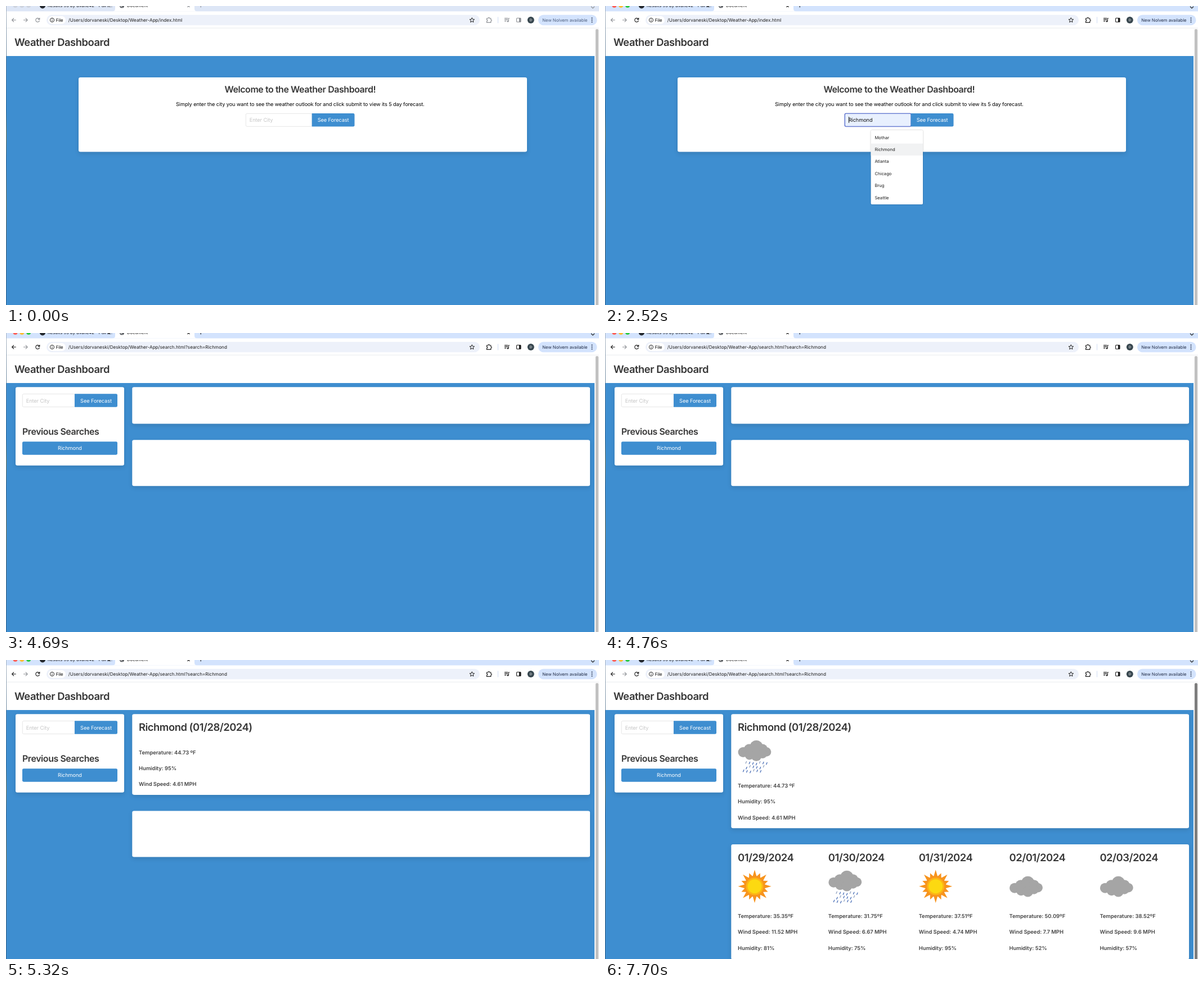
Animation of 1054x532 px, one loop 8000 ms. Source, as an HTML page:

```html
<!DOCTYPE html>
<html lang="en">
<head>
<meta charset="utf-8">
<title>Weather Dashboard</title>
<style>
  html, body { margin: 0; width: 100%; height: 100%; overflow: hidden; background: #fff; }
  svg { display: block; width: 1054px; height: 532px; --ink: #1f1f1f; --strip: #d3e3fd; --label: #1f2a44; }
  svg.idle { --ink: #8d9095; --strip: #dde6f6; --label: #4c5d7d; }
  text { font-family: Inter, "Liberation Sans", Arial, sans-serif; text-rendering: geometricPrecision; white-space: pre; }
  .body { font-size: 9.22px; letter-spacing: -.011em; }
  .title { font-size: 18.4px; font-weight: 600; letter-spacing: -.026em; fill: #363636; }
  .sub { font-size: 15.95px; font-weight: 600; letter-spacing: -.026em; fill: #363636; }
  .fact { font-size: 9.4px; font-weight: 600; letter-spacing: -.002em; fill: #424242; }
  .url { font-size: 8.17px; fill: #1f1f1f; }
  .small { font-size: 7.68px; fill: #1f1f1f; }
  .mid { text-anchor: middle; }
  .card { fill: #fff; filter: drop-shadow(0 3.5px 3.5px rgba(10, 10, 10, .13)); }
  .icon { fill: none; stroke: var(--ink); stroke-width: 1.15; }
  .field { fill: #fff; stroke: #dbdbdb; stroke-width: .7; }
  .field.on { stroke: #485fc7; stroke-width: 1.1; }
  .field.filled { fill: #e8f0fe; }
  .menu { fill: #fff; filter: drop-shadow(0 .6px 1px rgba(0, 0, 0, .28)); }
  .menu.soft { filter: drop-shadow(0 0 .6px rgba(0, 0, 0, .22)); }
</style>
</head>
<body>
<svg id="stage" viewBox="0 0 1054 532" xmlns="http://www.w3.org/2000/svg"></svg>
<script>
const LOOP = 8000;
const BLUE = '#3e8ed0';
const CITIES = ['Mothar', 'Richmond', 'Atlanta', 'Chicago', 'Brug', 'Seattle'];
const PATH = '/Users/dorvaneski/Desktop/Weather-App/';
const ROW = 21.4;

const text = (x, y, cls, str, extra = '') => `<text x="${x}" y="${y}" class="${cls}" ${extra}>${str}</text>`;
const rect = (x, y, w, h, r, attrs) => `<rect x="${x}" y="${y}" width="${w}" height="${h}" rx="${r}" ${attrs}/>`;
const circle = (x, y, r, attrs) => `<circle cx="${x}" cy="${y}" r="${r}" ${attrs}/>`;
const path = (d, attrs = 'class="icon"') => `<path d="${d}" ${attrs}/>`;
const card = (x, y, w, h) => rect(x, y, w, h, 3.3, 'class="card"');
const range = (n, fn) => Array.from({ length: n }, (_, i) => fn(i)).join('');

function star(cx, cy, points, radius) {
  let d = '';
  for (let i = 0; i < points * 2; i++) {
    const a = Math.PI * (i / points - .5), r = radius(i);
    d += `${i ? 'L' : 'M'}${(cx + r * Math.cos(a)).toFixed(2)} ${(cy + r * Math.sin(a)).toFixed(2)}`;
  }
  return d + 'Z';
}

// Weather icons, drawn in a 60 x 60 box
const BUMPS = [[9.5, 23, 9], [20.5, 18.5, 10], [33, 13.5, 11.5], [44, 17.5, 9],
  [51, 22.5, 8.3], [21, 28, 8.5], [33, 29.5, 9.4], [44, 26, 8]];
const puff = dy => BUMPS.map(([x, y, r]) => circle(x, y + dy, r, 'fill="#a5a5a5"')).join('');
const drops = range(19, i => {
  const row = Math.floor(i / 6.5), col = i % 6.5;
  const x = 15.5 + col * 6.1 - row * 2.3, y = 39.5 + row * 7 + (i * 5 % 4);
  return path(`M${x} ${y}l-1.4 3.3`, `stroke="${i % 4 ? '#4168b4' : '#8d9fbd'}" stroke-width="1.25" stroke-linecap="round"`);
});
const ICONS = {
  rain: puff(0) + drops,
  cloud: puff(10),
  sun: path(star(30, 30, 16, i => i % 2 ? 18 : i % 4 ? 25.5 : 29.5), 'fill="#f7941e"') +
    circle(30, 30, 18.5, 'fill="#f7941e"') + circle(30, 30, 15.5, 'fill="#fdb515"') + circle(30, 30, 12.5, 'fill="#fcd911"')
};

function toolbar() {
  const lights = ['#ff5f57', '#febc2e', '#28c840']
    .map((c, i) => circle(16.5 + i * 11.8, -1, 4, `class="light" fill="${c}"`)).join('');
  const cross = x => path(`M${x - 2} -2l4 4m0 -4l-4 4`);
  return rect(0, 0, 1054, 39, 0, 'fill="#fff"') +
    rect(0, 0, 1054, 9.5, 0, 'style="fill:var(--strip)"') + lights +
    path('M189 9.6Q194 9.6 194 5V-5H335V5Q335 9.6 340 9.6Z', 'fill="#fff"') +
    circle(65, -.5, 5, 'fill="#24292f"') +
    text(74, 2, 'small', 'Results 95 by dvane42 - Pull r…') + cross(183) +
    circle(206, -.5, 4, 'fill="#4b4f54"') + path('M203 1l2.5 -1 1 2.5M207 -3v2l2 1', 'fill="none" stroke="#fff" stroke-width=".9"') +
    text(215, 2, 'small', 'Document') + cross(324.5) +
    path('M343 -.5h6.4m-3.2 -3v6') + path('M1040 1l3 3 3 -3') +
    path('M17.8 25H10.6m3.4 -3.4L10.6 25l3.4 3.4', 'id="back" class="icon"') +
    path('M31 25h7.2m-3.4 -3.4L38.2 25l-3.4 3.4', 'fill="none" stroke="#8d9095" stroke-width="1.1"') +
    path('M59.1 23.2A3.4 3.4 0 1 0 59.5 26M59.8 21v2.9h-2.9') +
    rect(72, 15.8, 770, 18.4, 9.2, 'fill="#edf1fa"') + rect(75, 18, 31, 14, 7, 'fill="#fff"') +
    circle(82, 25, 3.6, 'fill="none" stroke="#1f1f1f" stroke-width=".95"') +
    path('M82 24.6v2.3M82 22.8v.9', 'stroke="#1f1f1f" stroke-width="1"') +
    text(88.7, 27.7, 'small', 'File', 'font-weight="500"') + text(110.8, 27.9, 'url', '', 'id="url"') +
    path(star(828.3, 25.3, 5, i => i % 2 ? 2 : 4.5), 'fill="none" stroke="#1f1f1f" stroke-width="1"') +
    path('M854.5 22h2.3a1.4 1.4 0 0 1 2.8 0h2.2v2.2a1.4 1.4 0 0 1 0 2.8v2.3h-7.3v-2.3a1.3 1.3 0 0 0 0 -2.6Z') +
    path('M874.5 19.5v11', 'stroke="#cfdcf3"') +
    path('M886 21.8h6M886 24.3h6M886 26.8h3.2M895 22h-1.8v5') + circle(892, 27.3, 1.4, 'style="fill:var(--ink)"') +
    rect(907.6, 21.5, 7.4, 7, 1, 'class="icon"') + rect(911.8, 21.5, 3.2, 7, 0, 'style="fill:var(--ink)"') +
    circle(932.8, 25, 6, 'fill="#38474f"') + text(932.8, 27.1, 'mid', 'D', 'font-size="5.8" fill="#fff"') +
    rect(946, 15.8, 104.5, 18.4, 9.2, 'fill="#d3e3fd"') +
    text(993.4, 27.8, 'small mid', 'New Nolvem available', 'style="fill:var(--label)"') +
    range(3, i => circle(1041.5, 21.6 + i * 3.4, 1, 'fill="#1f2a44"')) +
    path('M0 39.2H1054', 'stroke="#e3e6eb" stroke-width=".8"');
}

// City input joined to its submit button
function form(x, y, split, end, live) {
  const h = 23.6, mid = y + 15.4, id = name => live ? `id="${name}"` : '';
  return rect(x + .3, y + .3, split - x, h - .6, 2.2, `${id('field')} class="field"`) +
    path(`M${split} ${y}H${end - 2.4}q2.4 0 2.4 2.4v${h - 4.8}q0 2.4 -2.4 2.4H${split}Z`, `${id('submit')} fill="${BLUE}"`) +
    text(x + 6.7, mid, 'body', 'Enter City', `${id('entry')} fill="#c6c6c6"`) +
    text((split + end) / 2, mid, 'body mid', 'See Forecast', 'fill="#fff"');
}

function welcome() {
  return card(129, 127, 797, 132.5) +
    text(522.8, 154.4, 'sub mid', 'Welcome to the Weather Dashboard!') +
    text(522.8, 177.5, 'body mid', 'Simply enter the city you want to see the weather outlook for and click submit to view its 5 day forecast.') +
    rect(425.2, 190.2, 120, 25.2, 3, 'id="ring" fill="#485fc7" fill-opacity=".25"') +
    form(426, 191, 543.7, 619.5, true) +
    rect(433, 197, .9, 11, 0, 'id="caret" fill="#111"') +
    `<g id="popup">${rect(472.6, 221, 92.4, 132, 2, 'id="menu" class="menu"')}` +
    rect(472.6, 0, 92.4, ROW, 0, 'id="hover" fill="#f1f2f3"') +
    CITIES.map((c, i) => text(479.4, 236.6 + i * ROW, 'small', c)).join('') + '</g>';
}

const sidebar = () => card(17, 96.3, 193, 139.5) + form(29, 108.2, 122, 198, false) +
  text(29, 180.6, 'sub', 'Previous Searches') + rect(29, 193.2, 169, 23.5, 2.4, `fill="${BLUE}"`) +
  text(113.5, 208.4, 'body mid', 'Richmond', 'fill="#fff"');

function report(x, top, gap, title, icon, facts) {
  return text(x, top + 30, 'title', title) +
    (gap ? `<g transform="translate(${x} ${top + 44.7})">${ICONS[icon]}</g>` : '') +
    facts.map((f, i) => text(x, top + 71.3 + gap + i * 28.4, 'fact', f)).join('');
}

const DAYS = [
  ['01/29/2024', 'sun', '35.35', '11.52', 81], ['01/30/2024', 'rain', '31.75', '6.67', 75],
  ['01/31/2024', 'sun', '37.51', '4.74', 95], ['02/01/2024', 'cloud', '50.09', '7.7', 52],
  ['02/03/2024', 'cloud', '38.52', '9.6', 57]
];

function results(today, days, gap) {
  const h = today ? 143.6 + gap : 65.2, top = 96.3 + h + 28.7;
  return card(224.3, 96.3, 813.7, h) + card(224.3, top, 813.7, days ? 205 : 82) +
    (today ? report(236, 96.3, gap, 'Richmond (01/28/2024)', 'rain',
      ['Temperature: 44.73 ºF', 'Humidity: 95%', 'Wind Speed: 4.61 MPH']) : '') +
    (days ? DAYS.map(([date, icon, temp, wind, wet], i) => report(236 + i * 160.85, top, gap, date, icon,
      [`Temperature: ${temp}ºF`, `Wind Speed: ${wind} MPH`, `Humidity: ${wet}%`])).join('') : '');
}

const STAGES = [[4690, results(0, 0, 0)], [5250, results(1, 0, 0)], [5390, results(1, 1, 0)], [5460, results(1, 1, 59.4)]];

const stage = document.getElementById('stage');
stage.innerHTML = `<defs><linearGradient id="edge" x2="0" y2="1">
  <stop offset="0" stop-color="#a9b4c0"/><stop offset=".16" stop-color="#5f7c96"/><stop offset=".35" stop-color="#2f648f"/>
  <stop offset=".43" stop-color="#8a7a45"/><stop offset=".52" stop-color="#36618a"/><stop offset=".66" stop-color="#86703f"/>
  <stop offset=".78" stop-color="#50606a"/><stop offset="1" stop-color="#2c5f8c"/></linearGradient></defs>` +
  rect(0, 39, 1054, 50, 0, 'fill="#fff"') + rect(0, 89, 1046, 443, 0, `fill="${BLUE}"`) +
  text(15, 71.2, 'title', 'Weather Dashboard') +
  `<g id="welcome">${welcome()}</g><g id="search">${sidebar()}</g>` +
  STAGES.map(([, markup], i) => `<g id="stage${i}">${markup}</g>`).join('') +
  toolbar() + rect(1046, 39.6, 8, 493, 0, 'fill="#fafafa"') +
  rect(1048, 41, 5, 560, 2.5, 'id="thumb"') + rect(0, 0, .9, 532, 0, 'fill="url(#edge)"');

const el = Object.fromEntries([...stage.querySelectorAll('[id]')].map(n => [n.id, n]));
const lights = [...stage.querySelectorAll('.light')];
const colors = lights.map(n => n.getAttribute('fill'));

// Menu row under the pointer, by time
const POINTED = [[0, -1], [2100, 0], [2170, 1], [2240, 2], [2520, 1]];
const CARET = [[1120, 1820], [2310, 2870], [3360, 3850], [4410, 4620]];

const at = (steps, t) => steps.reduce((v, [start, value]) => t >= start ? value : v, steps[0][1]);
const set = (node, name, value) => node.setAttribute(name, value);
const show = (node, on) => set(node, 'display', on ? 'inline' : 'none');

function draw(t) {
  const idle = t < 770, navigated = t >= 4620, loaded = t >= 4690;
  const focused = t >= 1120 && !loaded;
  const row = at(POINTED, t);

  stage.classList.toggle('idle', idle);
  lights.forEach((n, i) => set(n, 'fill', idle ? '#cdd3de' : colors[i]));
  set(el.back, 'style', navigated ? '' : 'stroke:#8d9095');
  el.url.textContent = PATH + (navigated ? 'search.html?search=Richmond' : 'index.html');

  show(el.welcome, !loaded);
  show(el.search, loaded);
  STAGES.forEach(([start], i) => {
    const end = STAGES[i + 1] ? STAGES[i + 1][0] : LOOP;
    show(el['stage' + i], t >= start && t < end);
  });

  show(el.ring, focused);
  set(el.field, 'class', `field${focused ? ' on' : ''}${row >= 0 ? ' filled' : ''}`);
  el.entry.textContent = row < 0 ? 'Enter City' : CITIES[row];
  set(el.entry, 'fill', row < 0 ? '#c6c6c6' : '#111');
  set(el.submit, 'fill', t >= 4060 ? '#3488ce' : BLUE);
  show(el.caret, CARET.some(([a, b]) => t >= a && t < b));
  set(el.caret, 'x', t < 3360 ? 433 : 476.2);

  show(el.popup, t >= 1260 && t < 3360);
  set(el.menu, 'class', t < 1330 ? 'menu soft' : 'menu');
  show(el.hover, row >= 0);
  set(el.hover, 'y', 223.3 + Math.max(row, 0) * ROW);

  set(el.thumb, 'fill', t >= 7700 ? '#7d7d7d' : '#c1c1c1');
}

const begin = performance.now();
function tick() {
  draw((performance.now() - begin) % LOOP);
  requestAnimationFrame(tick);
}
tick();
</script>
</body>
</html>
```
